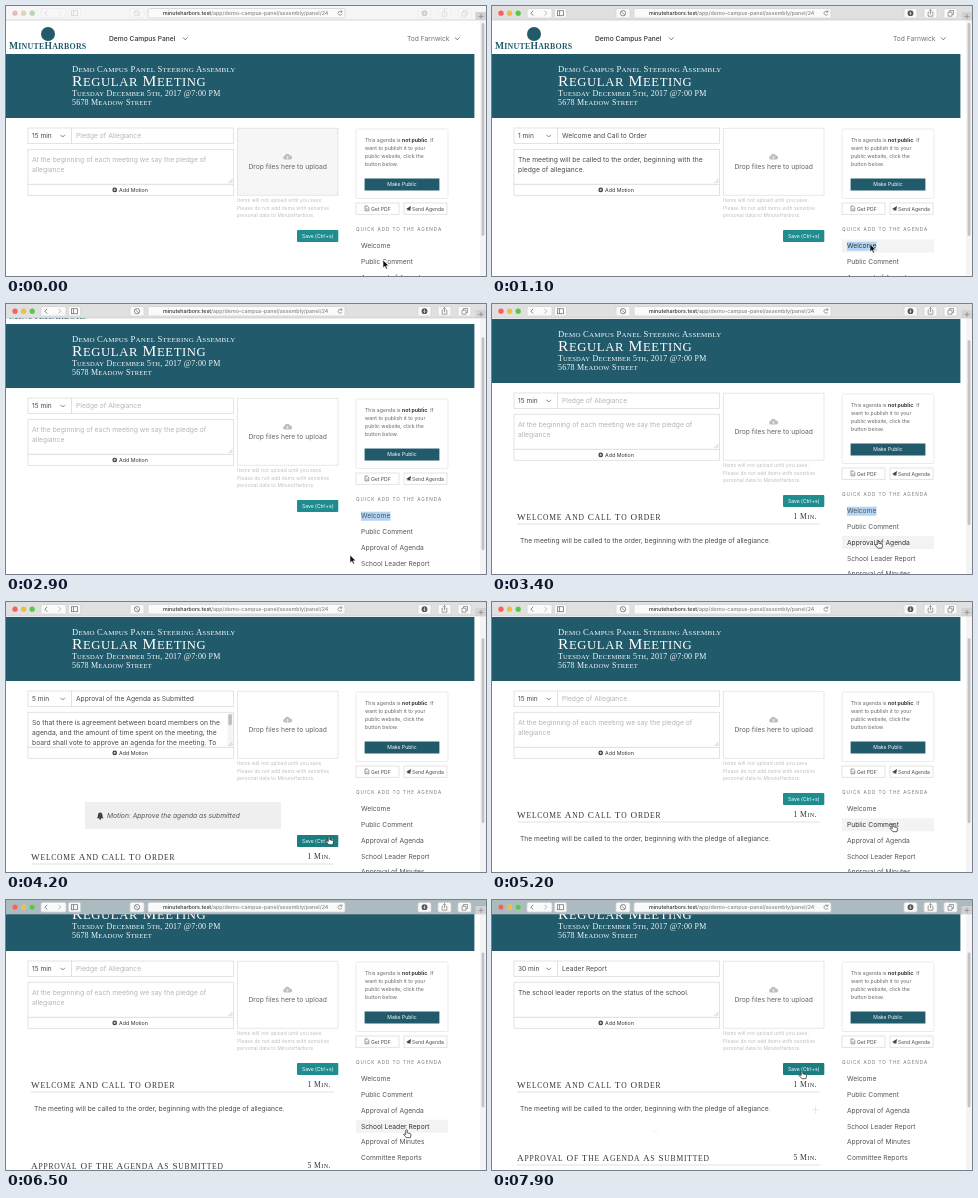
An HTML page for the animation above (8000 ms loop, 480x270 px).

```html
<!DOCTYPE html>
<html lang="en">
<head>
<meta charset="utf-8">
<title>Meeting agenda</title>
<style>
  html, body { margin: 0; width: 100%; height: 100%; overflow: hidden; background: #fff; }
  svg { display: block; width: 480px; height: 270px; font-family: Inter, "Open Sans", sans-serif; }
  text { white-space: pre; }
  .caps { font-family: "Liberation Serif", "Noto Serif", serif; text-transform: uppercase; }
  .caps tspan { font-size: .82em; }
</style>
</head>
<body>
<svg id="stage" viewBox="0 0 480 270"></svg>
<script>
const LOOP = 8000;
const TEAL = '#205a6b', INK = '#4a4a4a', PALE = '#b4b4b4', LINE = '#dcdcdc';

const text = (x, y, s, size = 6.7, fill = INK, extra = '') =>
  `<text x="${x}" y="${y}" font-size="${size}" fill="${fill}" ${extra}>${s}</text>`;
const caps = (x, y, s, size, gap, fill, extra = '') =>
  text(x, y, s.replace(/[a-z]+/g, '<tspan>$&</tspan>'), size, fill, `class="caps" letter-spacing="${gap}" ${extra}`);
const box = (x, y, w, h, fill = '#fff', stroke = 'none', extra = '') =>
  `<rect x="${x}" y="${y}" width="${w}" height="${h}" fill="${fill}" stroke="${stroke}" stroke-width=".8" ${extra}/>`;
const line = (d, stroke = '#777', width = .8, extra = '') =>
  `<path d="${d}" fill="none" stroke="${stroke}" stroke-width="${width}" ${extra}/>`;
const dot = (x, y, r, fill, extra = '') => `<circle cx="${x}" cy="${y}" r="${r}" fill="${fill}" ${extra}/>`;
const group = (id, body) => `<g id="${id}">${body}</g>`;
const middle = 'text-anchor="middle"';

const forms = {
  blank: ['15 min', 'Pledge of Allegiance',
    ['At the beginning of each meeting we say the pledge of', 'allegiance']],
  welcome: ['1 min', 'Welcome and Call to Order',
    ['The meeting will be called to the order, beginning with the', 'pledge of allegiance.']],
  agenda: ['5 min', 'Approval of the Agenda as Submitted',
    ['So that there is agreement between board members on the',
     'agenda, and the amount of time spent on the meeting, the',
     'board shall vote to approve an agenda for the meeting. To']],
  leader: ['30 min', 'Leader Report', ['The school leader reports on the status of the school.']]
};
const quickAdds = ['Welcome', 'Public Comment', 'Approval of Agenda', 'School Leader Report',
  'Approval of Minutes', 'Committee Reports', 'Adjournment'];
const rowY = i => 240 + 15.75 * i;

function formText(name) {
  const [minutes, title, lines] = forms[name];
  const ink = name === 'blank' ? PALE : INK;
  return group(name, text(26, 132.4, minutes, 6.6) + text(70, 132.4, title, 6.7, ink) +
    `<g clip-path="url(#area)">${lines.map((s, i) => text(26, 155.5 + 10.4 * i, s, 6.75, ink)).join('')}</g>`);
}

const nav =
  dot(42, 28, 7, TEAL) +
  caps(3, 43, 'MinuteHarbors', 9.6, .25, TEAL, 'font-weight="bold"') +
  text(103, 35, 'Demo Campus Panel', 6.7, '#333', 'font-weight="500"') +
  line('M177 31.5l2.3 2.3 2.3-2.3', '#555') +
  text(401, 35, 'Tod Farnwick', 6.7, '#707070') +
  line('M449 31.5l2.3 2.3 2.3-2.3', '#555');

const banner =
  box(0, 48, 468.4, 64, TEAL) +
  caps(66, 65.7, 'Demo Campus Panel Steering Assembly', 8.6, .2, '#f2f7f8') +
  caps(66, 80, 'Regular Meeting', 15.5, .6, '#fff') +
  caps(66, 90, 'Tuesday December 5th, 2017 @7:00 PM', 8, .2, '#f2f7f8') +
  caps(66, 99.2, '5678 Meadow Street', 8, .2, '#f2f7f8');

const form =
  box(22, 122, 43.5, 15.5, '#fff', LINE) + line('M54.5 128.8l2.2 2.2 2.2-2.2', '#666') +
  box(65.5, 122, 162, 15.5, '#fff', LINE) +
  box(22, 143.3, 205.5, 35, '#fff', LINE) +
  Object.keys(forms).map(formText).join('') +
  group('areaBar', box(221.5, 144, 5.3, 33, '#f5f5f5') + box(222.3, 145, 3.6, 11.5, '#bdbdbd', 'none', 'rx="1.8"')) +
  line('M222.5 177l4-4M224.7 177l1.8-1.8', '#999', .5) +
  box(22, 178.3, 205.5, 11, '#fff', LINE) +
  dot(108.7, 183.9, 2.3, '#333') + line('M107.4 183.9h2.6M108.7 182.6v2.6', '#fff', .7) +
  text(113, 185.8, 'Add Motion', 5.3, '#333') +
  box(231.5, 122.3, 100.5, 67, '#fff', '#cfcfcf', 'id="drop" stroke-dasharray="1.2 .8"') +
  `<path d="M278.5 153.5a1.9 1.9 0 0 1 .3-3.7a2.6 2.6 0 0 1 5-.3a2 2 0 0 1 .6 4z" fill="#bdbdbd"/>` +
  line('M281.5 153v-2.6M280.2 151.5l1.3-1.3 1.3 1.3', '#fff', .6) +
  text(281.7, 163, 'Drop files here to upload', 6.75, '#666', middle) +
  ['Items will not upload until you save.', 'Please do not add items with sensitive', 'personal data to MinuteHarbors.']
    .map((s, i) => text(231, 196 + 7.6 * i, s, 4.8, '#bcbcbc', 'letter-spacing=".15"')).join('');

const motion = group('motion',
  box(79, 233, 196, 27, '#efefef') +
  `<path d="M90.8 249.3q1.2-1 1.2-3.5a2.2 2.2 0 0 1 4.4 0q0 2.5 1.2 3.5z" fill="#444"/>` +
  dot(94.2, 249.8, 1, '#444') +
  text(101, 249.3, 'Motion: Approve the agenda as submitted', 6.7, '#555', 'font-style="italic"'));

const item = (id, y, title, minutes, note) => group(id,
  caps(25, y, title, 9.2, .8, '#333') +
  caps(301.5, y - 1, minutes, 7.6, .4, '#333') +
  line(`M25 ${y + 4}H328`, '#cfcfcf', .6) +
  text(28, y + 23, note));

const list = group('list',
  box(291, 224, 41.3, 12, '#1f8d8f', 'none', 'id="save" rx="1"') +
  text(311.7, 231.9, 'Save (Ctrl+s)', 5.1, '#fff', middle) +
  item('first', 249, 'Welcome And Call To Order', '1 Min.',
    'The meeting will be called to the order, beginning with the pledge of allegiance.') +
  group('handles', line('M323.5 267.5v7M320 271h7', '#dedede', .7) +
    [160, 163, 166].map(x => dot(x, 292, .6, '#ddd')).join('')) +
  item('second', 322, 'Approval Of The Agenda As Submitted', '5 Min.', ''));

const side =
  box(350, 123, 92, 69.5, '#fff', '#e6e6e6', 'rx="1.5"') +
  ['This agenda is <tspan font-weight="700" fill="#333">not public</tspan>. If', 'want to publish it to your',
   'public website, click the', 'button below.']
    .map((s, i) => text(359, 136.2 + 7.9 * i, s, 5.2, '#666')).join('') +
  box(358.6, 172.5, 74.8, 12, TEAL) + text(396, 180.4, 'Make Public', 5.1, '#fff', middle) +
  box(350, 197, 43, 11.3, '#fff', LINE) + box(398, 197, 43, 11.3, '#fff', LINE) +
  line('M359 200h2.4l1.4 1.4v3.4h-3.8zM360 203h1.8', '#555', .6) +
  text(365, 204.6, 'Get PDF', 5.1) +
  `<path d="M400 203l5-3-.8 5-1.6-1-.9 1.2v-1.7z" fill="#444"/>` + text(406, 204.6, 'Send Agenda', 5) +
  text(350, 224.6, 'QUICK ADD TO THE AGENDA', 4.7, '#777', 'letter-spacing=".9"') +
  box(350, 233.5, 92, 13, '#f3f3f3', 'none', 'id="hover"') +
  box(355, 235.7, 29.5, 9, '#b3d4f3', 'none', 'id="selection"') +
  quickAdds.map((s, i) => text(355, rowY(i) + 2.4, s, 6.7, '#555', `id="row${i}"`)).join('');

const lights = colours => colours.map((c, i) => dot(9 + 8.6 * i, 7.2, 2.6, c)).join('');
const panel = (x, w) => box(x, 2.5, w, 9.5, '#fafafa', '#d4d4d4', 'rx="1.5"');

const buttons = group('buttons',
  lights(['#f9605b', '#f2bd3f', '#5ac748']) +
  panel(35, 25) + line('M41.2 4.8l-2.3 2.4 2.3 2.4', '#666') + line('M52.5 4.8l2.3 2.4-2.3 2.4', '#aaa') +
  panel(62.5, 12) + box(65.5, 4.7, 6, 5, 'none', '#777') + line('M67.5 4.7v5') +
  panel(124, 14) + dot(131, 7.2, 2.7, 'none', 'stroke="#666" stroke-width=".7"') +
  line('M129.2 5.4l3.6 3.6', '#666', .7) +
  [412, 432, 452].map(x => panel(x, 13)).join('') +
  dot(418.5, 7.2, 2.9, '#555') + line('M418.5 5.4v3M417.3 7.4l1.2 1.2 1.2-1.2', '#fff', .6) +
  line('M437.3 6.2h-1.2v4h4.8v-4h-1.2M438.5 8.3V3.6M437.2 4.8l1.3-1.3 1.3 1.3', '#666', .6) +
  line('M456 6.2h4v4h-4zM457.5 6v-1.5h4v4h-1.3', '#666', .6));

const toolbar =
  box(0, 0, 480, 14, '#e0e0e0', 'none', 'id="bar"') + box(0, 0, 480, 14, TEAL, 'none', 'id="tint"') +
  line('M0 14H480', '#c2c2c2', .6) +
  lights(Array(3).fill('#dcdcdc')) + buttons +
  panel(142, 197) +
  `<g clip-path="url(#address)">${text(157, 9.2,
    'minuteharbors.test<tspan fill="#888">/app/demo-campus-panel/assembly/panel/2468</tspan>', 5.3, '#333', 'font-weight="500"')}</g>` +
  line('M335.7 6a2 2 0 1 0 .2 2M335.9 4.4v1.8h-1.8', '#777', .7) +
  box(469.5, 6, 10.5, 8, '#d2d2d2') + line('M472.5 10.4h5M475 7.9v5', '#777', .6);

const cursor =
  group('arrow', '<path d="M0 0v8l1.9-1.7 1.2 2.8 1.4-.6-1.2-2.7h2.5z" fill="#111" stroke="#fff" stroke-width=".6"/>') +
  group('hand', '<path d="M-.8 .7q.8-1.2 1.6 0v2.6l3 .7q.9.4.7 1.5l-.6 2.7h-4l-2.7-3q-.1-1.2 1-.8l1 .7z" fill="#fff" stroke="#222" stroke-width=".7"/>');

document.getElementById('stage').innerHTML =
  `<defs><clipPath id="view"><rect y="14" width="480" height="256"/></clipPath>
   <clipPath id="area"><rect x="22" y="144" width="199" height="34"/></clipPath>
   <clipPath id="address"><rect x="150" width="172" height="14"/></clipPath></defs>` +
  box(0, 0, 480, 270) +
  `<g clip-path="url(#view)">${group('page', nav + banner + form + motion + list + side)}
   ${box(474, 14, 6, 256, '#f4f4f4')}${box(475.6, 17, 2.8, 200, '#c3c3c3', 'none', 'id="thumb" rx="1.4"')}</g>` +
  toolbar + group('cursor', cursor);

const el = id => document.getElementById(id);
const set = (id, name, value) => el(id).setAttribute(name, value);
const show = (id, on) => set(id, 'visibility', on ? 'visible' : 'hidden');
const move = (id, x, y) => set(id, 'transform', `translate(${x} ${y})`);
const within = (t, spans) => spans.find(([a, b]) => t >= a && t < b);
const progress = (t, a, b) => Math.min(1, Math.max(0, (t - a) / (b - a)));
const easeOut = (u, power) => 1 - (1 - u) ** power;

const formTimes = [[0, 400, 'blank'], [400, 1900, 'welcome'], [1900, 3500, 'blank'],
  [3500, 4700, 'agenda'], [4700, 6900, 'blank'], [6900, LOOP, 'leader']];
const hoverTimes = [[350, 1300, 0], [3250, 3600, 2], [5100, 5600, 1], [5600, 6950, 3]];
const handTimes = [[1500, 2000], [3250, 3650], [4000, 4800], [5100, 7000], [7450, LOOP]];
const saveTimes = [[1500, 2000], [4000, 4700], [7500, LOOP]];
const path = [[0, 377, 254], [100, 377, 254], [350, 378, 238], [1100, 378, 238], [1600, 314, 228],
  [1900, 314, 228], [2600, 344, 251], [2900, 344, 251], [3300, 386, 236], [3500, 386, 236],
  [4100, 323, 234.5], [4600, 323, 234.5], [5200, 401, 221.5], [5700, 401, 221.5], [6100, 400.5, 229.5],
  [6800, 400.5, 229.5], [7650, 310, 170.5], [LOOP, 310, 170.5]];

function cursorAt(t) {
  const i = Math.max(1, path.findIndex(p => p[0] > t));
  const [a, ax, ay] = path[i - 1], [b, bx, by] = path[i];
  const u = progress(t, a, b), s = u * u * (3 - 2 * u);
  return [ax + (bx - ax) * s, ay + (by - ay) * s];
}

function render(t) {
  const scroll = 33 * easeOut(progress(t, 2600, 3200), 2.7) + 28 * easeOut(progress(t, 5400, 5700), 6.5);
  const current = within(t, formTimes)[2];
  const hover = within(t, hoverTimes);
  const hand = !!within(t, handTimes);
  const withMotion = current === 'agenda';
  const active = t >= 100;

  move('page', 0, -scroll);
  for (const name in forms) show(name, name === current);
  show('areaBar', withMotion);
  show('motion', withMotion);
  move('list', 0, withMotion ? 42 : 0);
  show('first', t >= 3100);
  show('second', t >= 5800);
  move('second', 0, t < 6900 ? 8 : 0);
  show('handles', t >= 7300);
  show('selection', t >= 600 && t < 3500);
  show('hover', !!hover);
  if (hover) set('hover', 'y', rowY(hover[2]) - 6.5);
  quickAdds.forEach((_, i) => set('row' + i, 'fill', hover && hover[2] === i ? '#333' : '#555'));
  set('save', 'fill', within(t, saveTimes) ? '#1a7d80' : '#1f8d8f');

  set('drop', 'fill', active ? '#fff' : '#f6f6f6');
  set('bar', 'fill', active ? '#e0e0e0' : '#f6f6f6');
  set('buttons', 'opacity', active ? 1 : .25);
  set('tint', 'opacity', .28 * progress(scroll, 34, 50));
  set('thumb', 'y', 17 + scroll * .58);
  set('thumb', 'height', t < 3100 ? 213 : t < 5800 ? 185 : 155);

  move('cursor', ...cursorAt(t));
  show('arrow', !hand);
  show('hand', hand);
}

const start = performance.now();
function tick() {
  render((performance.now() - start) % LOOP);
  requestAnimationFrame(tick);
}
tick();
</script>
</body>
</html>
```
